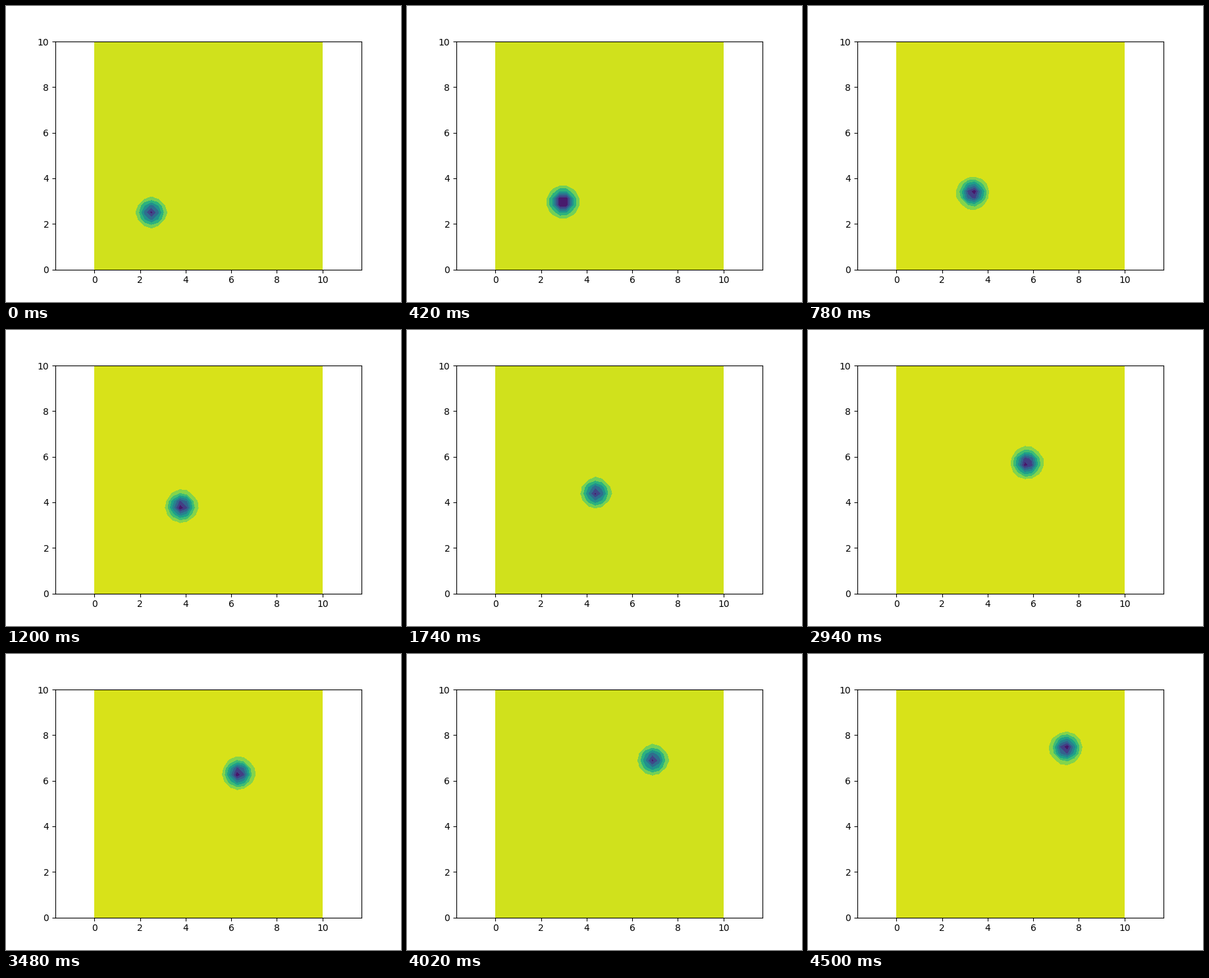
A matplotlib script for the animation above (4.56 s loop, 600 by 450 pixels).

```python
import numpy as np
import matplotlib.pyplot as plt
from matplotlib.animation import FuncAnimation

FRAMES = 76
INTERVAL = 60
START, END = 2.5, 7.5
DEPTH = 1.63      # depth of the well
SHARPNESS = 4     # exponent factor of the Gaussian

fig, ax = plt.subplots(figsize=(6, 4.5), dpi=100)
axis = np.linspace(0, 10, 33)
X, Y = np.meshgrid(axis, axis)

# Equal scale on both axes, with the square centred horizontally.
box = ax.get_position()
half_width = 5 * (box.width * 6) / (box.height * 4.5)
ax.set(xlim=(5 - half_width, 5 + half_width), ylim=(0, 10))
ax.set_autoscale_on(False)

contours = None


def well(center):
    r2 = (X - center) ** 2 + (Y - center) ** 2
    return -DEPTH * np.exp(-SHARPNESS * r2)


def nice_levels(z):
    """Evenly spaced levels from the lowest value up to zero."""
    depth = -z.min()
    step = 0.25 if depth > 1.6 else 0.2
    return np.arange(-np.ceil(depth / step), 1) * step


def draw(frame):
    global contours
    if contours is not None:
        contours.remove()
    z = well(START + (END - START) * frame / FRAMES)
    contours = ax.contourf(X, Y, z, levels=nice_levels(z), cmap="viridis")
    return [contours]


def reset():
    return draw(0)


anim = FuncAnimation(fig, draw, frames=FRAMES, init_func=reset,
                     interval=INTERVAL, repeat=True, repeat_delay=0)
plt.show()
```
